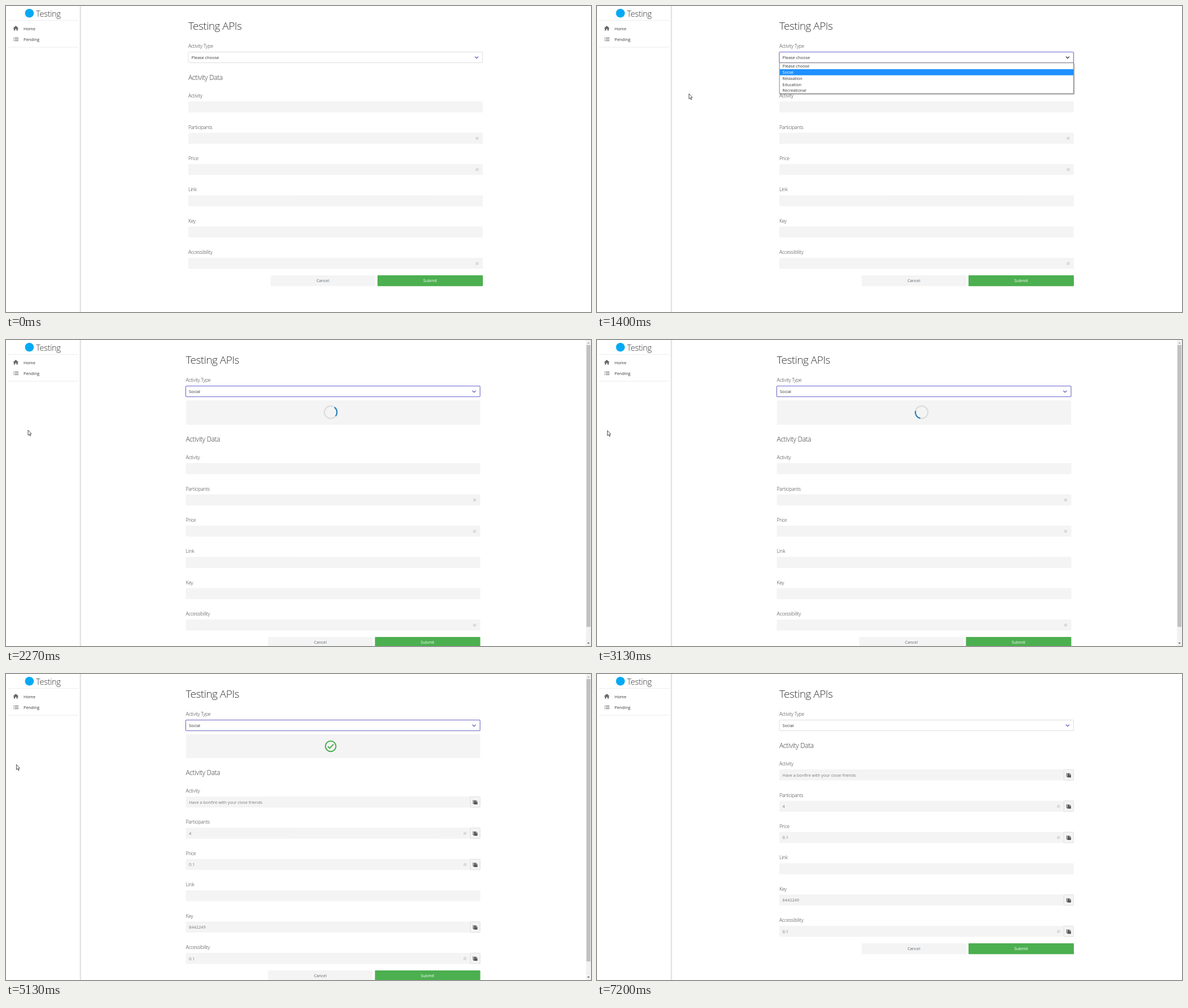
An HTML page for the animation above (8000 ms loop, 1033 by 542 pixels).

```html
<!DOCTYPE html>
<html lang="en">
<head>
<meta charset="utf-8">
<title>Testing APIs</title>
<style>
  html, body { margin: 0; width: 100%; height: 100%; overflow: hidden; background: #fff; }
  svg { display: block; width: 100vw; height: 100vh; }
  text { font: 7.35px "Open Sans", "Noto Sans", sans-serif; fill: #363636; white-space: pre; }
  .light { font-weight: 300; letter-spacing: -.03em; }
  .label { font-size: 8.6px; }
  .value { fill: #7a7a7a; }
  .mid { text-anchor: middle; }
  .fill { fill: #f4f4f4; }
  .hash { fill: none; stroke: #c4c4c4; stroke-width: .7; }
  #list { filter: drop-shadow(1px 1.5px 1.2px rgba(0, 0, 0, .4)); }
</style>
</head>
<body>
<svg id="stage" viewBox="0 0 1033 542">
  <defs>
    <clipPath id="panelClip"><rect id="clipBox" x="322" y="106.5" width="520" height="0"/></clipPath>
    <linearGradient id="edge"><stop stop-color="#d2d2d2"/><stop offset="1" stop-color="#fff"/></linearGradient>
  </defs>

  <g id="sidebar">
    <rect x="130.5" width="3" height="542" fill="url(#edge)"/>
    <path d="M3 25.5H128M3 73H128" stroke="#ededed"/>
    <circle cx="41.3" cy="12.8" r="7.8" fill="#03a9f4"/>
    <text x="53" y="18.7" class="light" style="font-size:14.8px">Testing</text>
    <path d="M17.3 35L12.3 39.6H13.8V43.6H16.2V40.7H18.4V43.6H20.8V39.6H22.3Z" fill="#666"/>
    <path d="M13 56.5h1.3M13 59h1.3M13 61.5h1.3M15.3 56.5H22M15.3 59H22M15.3 61.5H22" stroke="#666" stroke-width="1.1"/>
    <text x="31" y="42.6">Home</text>
    <text x="31" y="61.9">Pending</text>
  </g>

  <g id="page">
    <text x="322" y="42" class="light" style="font-size:19px">Testing APIs</text>
    <text x="322" y="74.4" class="light label">Activity Type</text>
    <rect id="select" x="321.9" y="81.5" width="519.7" height="19" rx="1.5" fill="#fff"/>
    <text id="choice" x="327.6" y="93.7"></text>
    <path id="chevron" d="M828 89.6L831 92.6L834 89.6" fill="none" stroke-width="1.3"/>

    <g id="panel" clip-path="url(#panelClip)">
      <rect class="fill" x="322" y="106.5" width="520" height="43.5"/>
      <g id="spinner" transform="translate(577.8 128)" fill="none" stroke-width="2.1">
        <circle r="11.1" stroke="#dcdcdc"/>
        <path id="arc" d="M-7.85-7.85A11.1 11.1 0 0 1 7.85-7.85" stroke="#2980b9"/>
      </g>
      <g id="check" transform="translate(577.8 128)" fill="none" stroke="#4caf50" stroke-width="2.1">
        <circle r="9.3"/>
        <path d="M-5 .2L-1.8 3.4L5-3.6"/>
      </g>
    </g>

    <g id="form"></g>
    <g id="list"></g>
  </g>

  <g id="scrollbar">
    <rect x="1024.3" width="8.7" height="542" fill="#f1f1f1"/>
    <rect id="thumb" x="1025" y="9" width="7" fill="#c1c1c1"/>
    <path d="M1026.4 6.3h4.2l-2.1-2.3Z" fill="#a3a3a3"/>
    <path d="M1026.4 536h4.2l-2.1 2.3Z" fill="#505050"/>
  </g>

  <g id="cursor" stroke="#222" stroke-width=".8" fill="#fff" stroke-linejoin="round">
    <path id="arrow" d="M.4.4V9.4L2.4 7.6L3.8 10.8L5.2 10.2L3.8 7.1L6.4 6.9Z"/>
    <path id="hand" d="M1.2 1.2Q2.2.2 3 1.2V5.2Q4 4.3 4.8 5.3Q5.8 4.6 6.4 5.7Q7.6 5.2 7.7 6.6V9.2Q7.6 11 6.6 12.6H2Q1.2 10.6-.9 8.6Q-2.6 6.6-.8 6.6L1.2 8.2Z"/>
  </g>
</svg>

<script>
const LOOP = 8000;
const ROW_STEP = 55.4;
const PANEL_HEIGHT = 43.5;
const PANEL_MARGIN = 5.5;
const at = { open: 850, hover: 1250, pick: 1790, slideDown: 1834, spin: 1812, loaded: 4310,
             slideUp: 5090, hidePanel: 5560, blur: 7190 };

const fields = [
  { name: "Activity", value: "Have a bonfire with your close friends" },
  { name: "Participants", value: "4", numeric: true },
  { name: "Price", value: "0.1", numeric: true },
  { name: "Link", value: "" },
  { name: "Key", value: "8442249" },
  { name: "Accessibility", value: "0.1", numeric: true },
];
const options = ["Please choose", "Social", "Relaxation", "Education", "Recreational"];

// time, x, y of the pointer tip
const pointerPath = [
  [70, 4, 43], [800, 162, 125], [1130, 162, 125], [1400, 162, 155], [1790, 162, 155],
  [2000, 133, 156], [2330, 18, 160], [5870, 18, 160], [6050, 330, 181], [6260, 970, 89],
];

const $ = id => document.getElementById(id);
const set = (id, attrs) => Object.entries(attrs).forEach(([key, value]) => $(id).setAttribute(key, value));
const show = (id, visible) => set(id, { visibility: visible ? "visible" : "hidden" });
const clamp = v => Math.min(1, Math.max(0, v));
const swing = (t, start, duration) => .5 - Math.cos(clamp((t - start) / duration) * Math.PI) / 2;

const hash = (x, cls) =>
  `<path class="hash ${cls}" d="M${x - 1} 7.3l-.6 5.4M${x + 1.4} 7.3l-.6 5.4M${x - 2.7} 8.9h5.6M${x - 2.9} 11.2h5.6"/>`;

const copyButton = `
  <rect x="824.3" y=".4" width="17.3" height="18.7" rx="1" fill="#f4f4f4" stroke="#dbdbdb" stroke-width=".8"/>
  <path d="M829.4 6.2V12.7H834.4" fill="none" stroke="#555" stroke-width="1"/>
  <path d="M830.8 6.8H834.6L837 9.2V14.2H830.8Z" fill="#555"/>
  <path d="M834.2 7.3V9.6H836.5" fill="none" stroke="#f4f4f4" stroke-width=".6"/>`;

const fieldMarkup = ({ name, value, numeric }, i) => `
  <g transform="translate(0 ${169 + i * ROW_STEP})">
    <text x="322" y="-6.8" class="light label">${name}</text>
    <rect class="fill" x="322" width="520" height="19.5" rx="1"/>
    ${numeric ? hash(832, "empty") + hash(815, "filled") : ""}
    ${value && `<g class="filled"><text x="327.6" y="12.7" class="value">${value}</text>${copyButton}</g>`}
  </g>`;

$("form").innerHTML = `
  <text x="322" y="131.4" class="light" style="font-size:11.9px">Activity Data</text>
  ${fields.map(fieldMarkup).join("")}
  <rect class="fill" x="467.3" y="477" width="184.7" height="19.2" rx="1"/>
  <text x="559.5" y="489.4" class="mid" style="fill:#5f6b76">Cancel</text>
  <rect x="656" y="477" width="186" height="19.2" rx="1" fill="#4caf50"/>
  <text x="748.8" y="489.4" class="mid" style="fill:#fff">Submit</text>`;

$("list").innerHTML = `
  <rect x="322.2" y="100.7" width="519.4" height="54.3" fill="#fff" stroke="#767676" stroke-width=".8"/>
  <rect id="highlight" x="322.6" width="518.6" height="10.8" fill="#1e90ff"/>
  ${options.map((name, i) => `<text class="option" x="327.6" y="${109.2 + i * 10.8}" style="font-size:7.2px">${name}</text>`).join("")}`;

function pointerAt(t) {
  const i = pointerPath.findIndex(key => key[0] > t);
  if (i < 1) return null;
  const [t0, x0, y0] = pointerPath[i - 1], [t1, x1, y1] = pointerPath[i];
  const k = (t - t0) / (t1 - t0);
  return [x0 + (x1 - x0) * k, y0 + (y1 - y0) * k];
}

function render(t) {
  const open = t >= at.open && t < at.pick;
  const focused = t >= at.open && t < at.blur;
  const loaded = t >= at.loaded;
  const panelShown = t >= at.slideDown && t < at.hidePanel;
  const height = PANEL_HEIGHT * (swing(t, at.slideDown, 400) - swing(t, at.slideUp, 400));
  const offset = panelShown ? PANEL_MARGIN + height : 0;
  const contentHeight = 520 + offset;
  const scrolls = contentHeight > 542;

  set("page", { transform: `translate(${scrolls ? -4.5 : 0} 0)` });
  set("form", { transform: `translate(0 ${offset})` });
  show("scrollbar", scrolls);
  set("thumb", { height: 524 * Math.min(1, 542 / contentHeight) });

  set("select", { stroke: focused ? "#6a67cc" : "#dbdbdb", "stroke-width": focused ? 1.1 : .9 });
  set("chevron", { stroke: open ? "#222" : "#5550c8" });
  $("choice").textContent = options[t < at.pick ? 0 : 1];

  const active = t < at.hover ? 0 : 1;
  show("list", open);
  set("highlight", { y: 101.1 + active * 10.8 });
  document.querySelectorAll(".option").forEach((el, i) => el.style.fill = i === active ? "#fff" : "#363636");

  show("panel", panelShown);
  set("clipBox", { height });
  $("spinner").style.display = loaded ? "none" : "";
  set("arc", { transform: `rotate(${(t - at.spin) * .18})` });
  set("check", { opacity: loaded ? swing(t, 4400, 800) : 0 });

  document.querySelectorAll(".filled").forEach(el => el.style.display = loaded ? "" : "none");
  document.querySelectorAll(".empty").forEach(el => el.style.display = loaded ? "none" : "");

  const pointer = pointerAt(t);
  const overSelect = t > 700 && t < 1180;
  $("cursor").style.display = pointer ? "" : "none";
  if (pointer) set("cursor", { transform: `translate(${pointer})` });
  $("arrow").style.display = overSelect ? "none" : "";
  $("hand").style.display = overSelect ? "" : "none";
}

const start = performance.now();
function tick() {
  render((performance.now() - start) % LOOP);
  requestAnimationFrame(tick);
}
tick();
</script>
</body>
</html>
```
